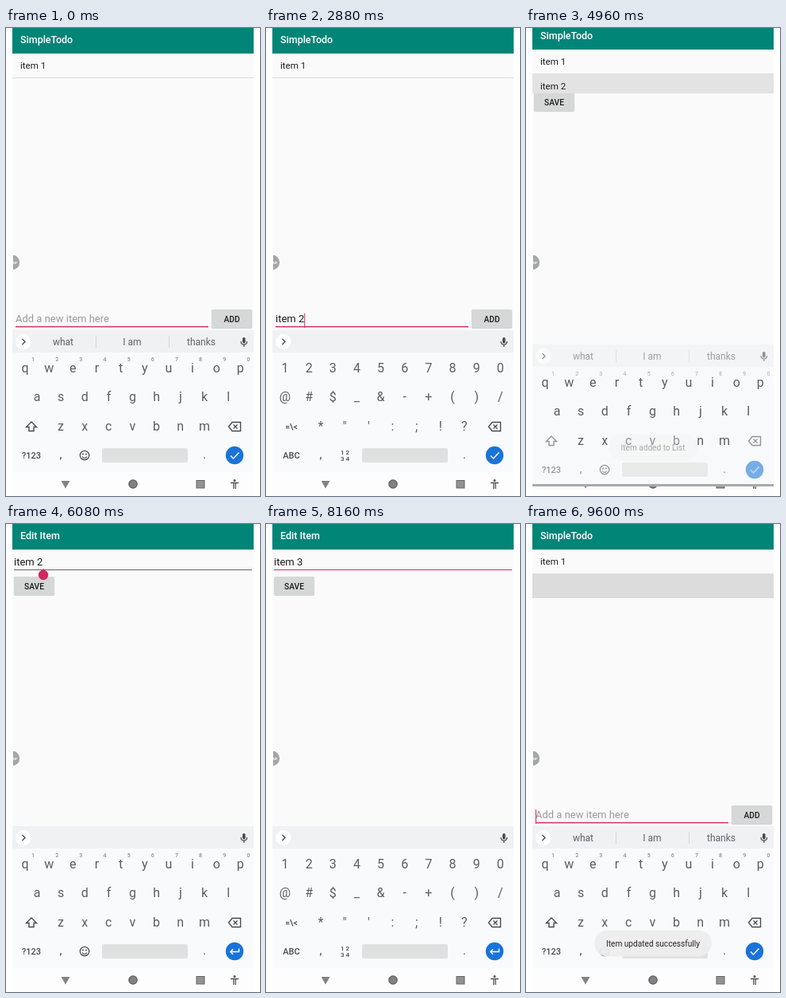
Recreate the animation shown at these times as an HTML page with a canvas. Size 320x587 px, loop 9760 ms.

```html
<!DOCTYPE html>
<html lang="en">
<head>
<meta charset="utf-8">
<title>Todo app demo</title>
<style>
html, body { margin: 0; width: 100%; height: 100%; overflow: hidden; background: #fff; }
canvas { display: block; }
</style>
</head>
<body>
<canvas id="stage" width="320" height="587"></canvas>
<script>
const ctx = document.getElementById('stage').getContext('2d');
const LOOP = 9760, TICK = 160;
const PINK = '#d02a62', INK = '#1c1c1c', ICON = '#464b50';
const DEFAULT_WORDS = ['what', 'I am', 'thanks'];

const LAYOUTS = {
  letters: [['qwertyuiop', 24, 427], ['asdfghjkl', 39, 463], ['zxcvbnm', 69, 500]],
  symbols: [['1234567890', 24, 427], ['@#$_&-+()/', 24, 463], ['*"\':;!?', 69, 500]]
};

// Each entry patches the state from its time (ms) onwards.
const TIMELINE = [
  [0, { page: 'main', items: ['item 1'], input: '', edit: 'item 2', mode: 'letters', words: DEFAULT_WORDS,
        cursor: false, underline: false, popup: '', press: '', row: -1, rowColor: '#e3e3e3',
        toast: '', toastAlpha: 0, editLine: '#666', handle: false, slide: 0, kbDrop: 0, kbAlpha: 1 }],
  [480, { popup: 'i', cursor: true }],
  [640, { popup: '', input: 'i', underline: true, words: ['i', "I'm", 'it'] }],
  [800, { popup: 't' }],
  [960, { popup: 'e', input: 'it', words: ['it', "it's", 'its'] }],
  [1120, { popup: '', input: 'ite', words: ['ite', 'item', 'items'] }],
  [1280, { popup: 'm' }],
  [1440, { popup: '', input: 'item', words: ['item', 'items', 'itemized'] }],
  [1600, { input: 'item ', underline: false, words: ['is', 'in', 'for'] }],
  [2080, { press: 'mode' }],
  [2240, { press: '', mode: 'symbols', words: [] }],
  [2560, { popup: '2' }],
  [2720, { popup: '', input: 'item 2' }],
  [3040, { press: 'add' }],
  [3200, { press: '', input: '', items: ['item 1', 'item 2'], mode: 'letters', words: DEFAULT_WORDS,
           toast: 'Item added to List', toastAlpha: 0.5 }],
  [3360, { toastAlpha: 1 }],
  [3680, { cursor: false }],
  [4160, { cursor: true }],
  [4640, { row: 1 }],
  [4800, { page: 'opening', slide: 0.04, cursor: false }],
  [4960, { slide: 0.38, kbDrop: 18, kbAlpha: 0.58, toastAlpha: 0.38 }],
  [5120, { slide: 0.8, kbDrop: 60, kbAlpha: 0.25, toastAlpha: 0 }],
  [5280, { page: 'edit', kbDrop: 200, row: -1, words: [] }],
  [5600, { kbDrop: 18, kbAlpha: 0.58 }],
  [5760, { kbDrop: 0, kbAlpha: 1, handle: true, cursor: true }],
  [6080, { cursor: false }],
  [6400, { press: 'delete', cursor: true, editLine: PINK }],
  [6560, { press: '', edit: 'item ', handle: false }],
  [6720, { press: 'mode' }],
  [6880, { press: '', mode: 'symbols' }],
  [7360, { popup: '3' }],
  [7520, { edit: 'item 3' }],
  [7680, { popup: '' }],
  [8160, { cursor: false }],
  [8320, { press: 'save' }],
  [8480, { press: '', page: 'closing', slide: 0.62, items: ['item 1', 'item 3'], kbDrop: 18, kbAlpha: 0.58,
           toast: 'Item updated successfully', toastAlpha: 0.5 }],
  [8640, { slide: 0.2, kbDrop: 60, kbAlpha: 0.25, toastAlpha: 1 }],
  [8800, { page: 'main', mode: 'letters', words: DEFAULT_WORDS, kbDrop: 18, kbAlpha: 0.58 }],
  [8960, { kbDrop: 0, kbAlpha: 1, cursor: true }],
  [9280, { row: 1 }],
  [9440, { rowColor: '#dcdcdc' }],
  [9600, { items: ['item 1', ''] }]
];

function rect(x, y, w, h, color) {
  ctx.fillStyle = color;
  ctx.fillRect(x, y, w, h);
}

function card(x, y, w, h, radius, color, blur = 1) {
  ctx.save();
  ctx.shadowColor = 'rgba(0,0,0,.2)';
  ctx.shadowBlur = blur;
  ctx.shadowOffsetY = blur / 2;
  ctx.fillStyle = color;
  ctx.beginPath();
  ctx.roundRect(x, y, w, h, radius);
  ctx.fill();
  ctx.restore();
}

function disc(x, y, r, color) {
  ctx.fillStyle = color;
  ctx.beginPath();
  ctx.arc(x, y, r, 0, 7);
  ctx.fill();
}

function text(str, x, y, size, color, weight = 400, align = 'left') {
  ctx.font = `${weight} ${size}px Roboto, sans-serif`;
  ctx.textAlign = align;
  ctx.fillStyle = color;
  ctx.fillText(str, x, y);
  return ctx.measureText(str).width;
}

const centered = (str, x, y, size, color, weight) => text(str, x, y, size, color, weight, 'center');

function stroke(path, color = ICON, width = 1.4) {
  ctx.strokeStyle = color;
  ctx.lineWidth = width;
  ctx.stroke(new Path2D(path));
}

function fill(path, color = ICON) {
  ctx.fillStyle = color;
  ctx.fill(new Path2D(path));
}

function pageBase(title) {
  rect(8, 0, 304, 587, '#fafafa');
  rect(8, 0, 304, 32, '#008577');
  rect(8, 32, 304, 1, '#eceeee');
  text(title, 18, 19, 12.5, '#fff', 500);
}

function button(label, x, y, pressed) {
  card(x, y, 51, 23.5, 2, pressed ? '#bfc0c0' : '#d6d7d7');
  centered(label, x + 25.5, y + 15.5, 10.2, INK, 500);
}

function field(value, x, baseline, s) {
  const width = text(value, x, baseline, 13, INK);
  if (s.underline) rect(x, baseline + 1.5, width, 1, INK);
  if (s.cursor) rect(x + width, baseline - 11, 1, 18, PINK);
}

function mainPage(s) {
  pageBase('SimpleTodo');
  s.items.forEach((item, i) => {
    const y = 32 + i * 30.5;
    if (s.row === i) rect(8, y, 304, 30.5, s.rowColor);
    text(item, 18, y + 19, 11.6, INK);
    rect(8, Math.floor(y + 30), 304, 1, '#dcdcdc');
  });
  if (!s.input) text('Add a new item here', 12, 369, 13, '#9a9a9a');
  field(s.input, 12, 369, s);
  rect(12, 374, 243, 1.4, PINK);
  button('ADD', 259, 353, s.press === 'add');
}

function editPage(s) {
  pageBase('Edit Item');
  field(s.edit, 10, 52, s);
  rect(10, 57, 300, 1, s.editLine);
  button('SAVE', 10, 66, s.press === 'save');
  if (s.handle) {
    fill('M47 56L52 61H42Z', PINK);
    disc(47, 64, 6.2, PINK);
  }
}

// The list drifts up while the editor is revealed from below.
function transition(s) {
  const rest = 1 - s.slide;
  ctx.save();
  ctx.translate(0, -Math.round(12 * s.slide));
  mainPage(s);
  ctx.restore();
  ctx.save();
  ctx.beginPath();
  ctx.rect(8, Math.round(587 * rest ** 4.12), 304, 587);
  ctx.clip();
  ctx.translate(0, Math.round(24 * rest));
  editPage(s);
  ctx.restore();
}

function navBar() {
  rect(8, 557, 304, 30, '#fdfdfd');
  fill('M69.5 568H80.5L75 577.5Z', '#858083');
  disc(160, 572, 5.8, '#5e5a5c');
  disc(160, 572, 4.6, '#858083');
  rect(239.5, 567, 11, 10.5, '#666');
  rect(240.5, 568, 9, 8.5, '#959092');
  disc(288, 567.5, 1.5, '#555');
  stroke('M283 570.5H293M286.8 571V578M289.2 571V578', '#555', 1.3);
}

function bubble() {
  ctx.save();
  ctx.beginPath();
  ctx.rect(9, 280, 20, 30);
  ctx.clip();
  disc(8, 294, 9.2, '#a5a6a7');
  text('ur', 9, 296, 6, '#fff', 500);
  ctx.restore();
}

function suggestionStrip(words) {
  rect(8, 379, 304, 28, '#eff1f3');
  disc(22, 393.5, 9.7, '#fff');
  stroke('M20.5 390L24 393.5L20.5 397');
  words.forEach((word, i) => centered(word, 72 + 87 * i, 398, 12, '#5f6368'));
  if (words.length) [113, 205].forEach(x => rect(x, 386, 1, 15, '#d3d6d9'));
  ctx.fillStyle = ICON;
  ctx.beginPath();
  ctx.roundRect(298, 388, 3.6, 7.5, 1.8);
  ctx.fill();
  stroke('M296 393C296 398.4 303.6 398.4 303.6 393M299.8 397V400', ICON, 1.2);
}

function characterKeys(mode) {
  LAYOUTS[mode].forEach(([row, x, y]) => {
    [...row].forEach((key, i) => centered(key, x + 30.15 * i, y + 4.5, 16, '#5a5e62'));
  });
}

function controlKeys(s) {
  const symbols = s.mode === 'symbols';
  if (s.press === 'mode') card(14, 522, 36, 29, 4, '#e3e6e8', 0);
  if (s.press === 'delete') card(273, 486, 30, 29, 4, '#e3e6e8', 0);
  centered(symbols ? 'ABC' : '?123', 32, 540, 11, ICON, 500);
  if (symbols) {
    centered('=\\<', 32, 504, 10.5, ICON, 500);
    centered('1 2', 99.5, 535, 8, ICON, 500);
    centered('3 4', 99.5, 543, 8, ICON, 500);
  } else {
    for (let i = 0; i < 10; i++) centered((i + 1) % 10, 34 + 30.15 * i, 418, 7, '#6d7175');
    stroke('M32 494L38.5 500.5H35V505.5H29V500.5H25.5Z');
    ctx.beginPath();
    ctx.arc(99, 536, 5.7, 0, 7);
    ctx.lineWidth = 1.2;
    ctx.stroke();
    disc(97, 534.5, 0.9, ICON);
    disc(101, 534.5, 0.9, ICON);
    stroke('M96 537.5Q99 541.5 102 537.5', ICON, 1.2);
  }
  stroke('M285 494.5H295.5V505.5H285L280.5 500ZM286.5 497.5L291.5 502.5M291.5 497.5L286.5 502.5');
  centered(',', 69, 540, 15, ICON);
  centered('.', 250, 540, 15, ICON);
  card(121, 527, 108, 18, 2, '#dfe1e1', 0);

  disc(288, 536, 11.2, '#1a73d9');
  if (s.page === 'main' || s.page === 'opening') stroke('M283 536.5L286.5 540L293.5 532.5', '#fff', 1.5);
  else stroke('M293.5 532.5V536.5H283M286 533.2L282.8 536.5L286 539.8', '#fff', 1.5);
}

function keyPopup(s) {
  for (const [row, x, y] of LAYOUTS[s.mode]) {
    const index = row.indexOf(s.popup);
    if (index < 0) continue;
    const keyX = x + 30.15 * index;
    card(keyX - 13, y - 61, 26, 75, 3, '#f4f5f6', 3);
    centered(s.popup, keyX + 1, y - 36, 16, '#50555a');
    centered('...', keyX + 7.5, y - 29, 8, ICON, 500);
  }
}

function keyboard(s) {
  if (s.kbDrop > 180) return;
  ctx.save();
  ctx.beginPath();
  ctx.rect(8, 379, 304, s.kbDrop ? 196 : 178);
  ctx.clip();
  ctx.translate(0, s.kbDrop);
  rect(8, 379, 304, 196, '#fafafa');
  ctx.globalAlpha = s.kbAlpha;
  suggestionStrip(s.words);
  rect(8, 407, 304, 150, '#f9fafb');
  controlKeys(s);
  ctx.globalAlpha = 1;
  characterKeys(s.mode);
  ctx.restore();
  if (s.kbDrop) rect(8, 572, 304, 3, '#aaa');
  if (s.popup) keyPopup(s);
}

function toast(s) {
  if (!s.toastAlpha) return;
  ctx.save();
  ctx.globalAlpha = s.toastAlpha * 0.95;
  ctx.font = '400 10.1px Roboto, sans-serif';
  const width = ctx.measureText(s.toast).width + 30;
  card(160 - width / 2, 509.5, width, 33, 16.5, '#eeeeee', 0);
  centered(s.toast, 160, 529.5, 10.1, INK);
  ctx.restore();
}

function stateAt(time) {
  const patches = TIMELINE.filter(([start]) => start <= time).map(([, patch]) => patch);
  return Object.assign({}, ...patches);
}

function draw(time) {
  const s = stateAt(time);
  rect(0, 0, 320, 587, '#fff');
  if (s.page === 'main') mainPage(s);
  else if (s.page === 'edit') editPage(s);
  else transition(s);
  navBar();
  keyboard(s);
  bubble();
  toast(s);
}

const startTime = performance.now();
function frame() {
  const time = (performance.now() - startTime) % LOOP;
  draw(Math.floor(time / TICK) * TICK);
  requestAnimationFrame(frame);
}
frame();
</script>
</body>
</html>
```
